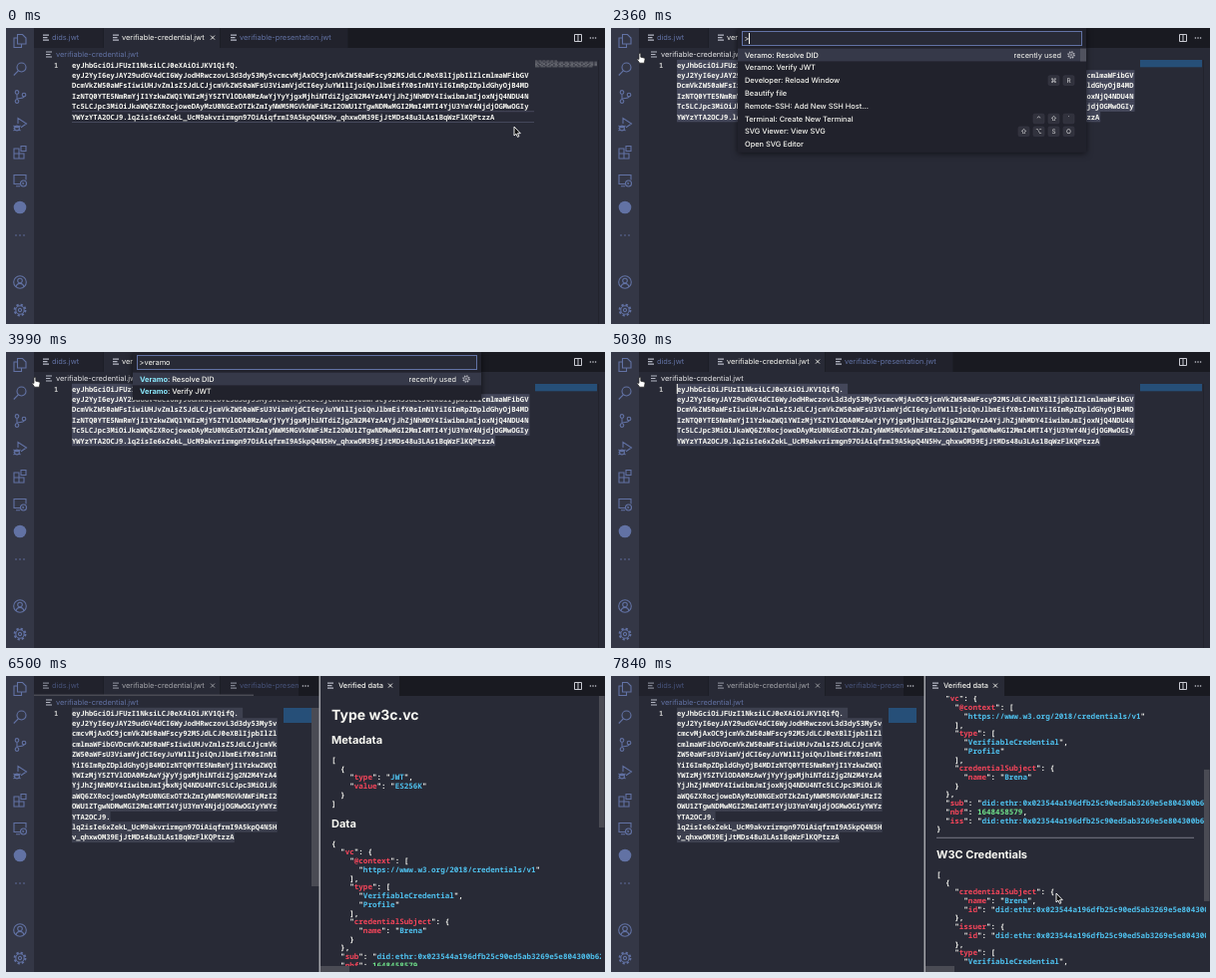
These frames come from a looping animation (600x297 px, 8 s). An HTML page:

```html
<!DOCTYPE html>
<html lang="en">
<head>
<meta charset="utf-8">
<title>Verifying a credential in the editor</title>
<style>
html, body { margin: 0; width: 100%; height: 100%; overflow: hidden; background: #282a36; }
svg { display: block; }
#stage { width: 100%; height: 100%; }
text { white-space: pre; text-rendering: geometricPrecision; font-family: Inter, "DejaVu Sans", sans-serif; }
.mono { font-family: "Noto Sans Mono", "DejaVu Sans Mono", monospace; font-weight: 600; }
.shadow { filter: drop-shadow(0 1px 3px #0009); }
</style>
</head>
<body>
<svg id="stage" viewBox="0 0 600 297"></svg>
<script>
const LOOP = 8000;
const BG = '#282a36', BAR = '#191a21', PANEL = '#21222c', SEL = '#44475a', IDLE_SEL = '#3d404f';
const MUTED = '#6272a4', FG = '#f8f8f2', THUMB = '#4a4b54';
const LEFT = 66, TOP = 37, LINE = 10.4, CHAR = 4.285;

const header = 'eyJhbGciOiJFUzI1NksiLCJ0eXAiOiJKV1QifQ.';
const payload =
  'eyJ2YyI6eyJAY29udGV4dCI6WyJodHRwczovL3d3dy53My5vcmcvMjAxOC9jcmVkZW50aWFscy92MSJdLCJ0eXBlIjpbIlZlcmlmaWFibGV' +
  'DcmVkZW50aWFsIiwiUHJvZmlsZSJdLCJjcmVkZW50aWFsU3ViamVjdCI6eyJuYW1lIjoiQnJlbmEifX0sInN1YiI6ImRpZDpldGhyOjB4MD' +
  'IzNTQ0YTE5NmRmYjI1YzkwZWQ1YWIzMjY5ZTVlODA0MzAwYjYyYjgxMjhiNTdiZjg2N2M4YzA4YjJhZjNhMDY4IiwibmJmIjoxNjQ4NDU4N' +
  'Tc5LCJpc3MiOiJkaWQ6ZXRocjoweDAyMzU0NGExOTZkZmIyNWM5MGVkNWFiMzI2OWU1ZTgwNDMwMGI2MmI4MTI4YjU3YmY4NjdjOGMwOGIy' +
  'YWYzYTA2OCJ9.';
const signature = 'lq2isIe6xZekL_UcM9akvrirmgn97OiAiqfrmI9A5kpQ4N5Hv_qhxwOM39EjJtMDs48u3LAs1BqWzFlKQPtzzA';

const chunk = (s, n) => s.match(new RegExp(`.{1,${n}}`, 'g'));
const wideRows = [header, ...chunk(payload + signature, 107)];
const slimRows = [header, ...chunk(payload, 48), ...chunk(signature, 48)];

const did = 'did:ethr:0x023544a196dfb25c90ed5ab3269e5e804300b62b8128b57bf867c8c08b2af3a068';
const types = ['VerifiableCredential', 'Profile'];
const name = 'Brena';
const metadata = [{ type: 'JWT', value: 'ES256K' }];
const data = {
  vc: { '@context': ['https://www.w3.org/2018/credentials/v1'], type: types, credentialSubject: { name } },
  sub: did, nbf: 1648458579, iss: did
};
const credentials = [{ credentialSubject: { name, id: did }, issuer: { id: did }, type: types }];

const commands = [
  ['Veramo: Resolve DID'], ['Veramo: Verify JWT'], ['Developer: Reload Window', '⌘R'], ['Beautify file'],
  ['Remote-SSH: Add New SSH Host...'], ['Terminal: Create New Terminal', '⌃⇧`'],
  ['SVG Viewer: View SVG', '⇧⌥SO'], ['Open SVG Editor']
];

// Basic shapes; text is placed by its vertical centre.
const rect = (x, y, w, h, fill, more = '') => `<rect x="${x}" y="${y}" width="${w}" height="${h}" fill="${fill}" ${more}/>`;
const text = (x, y, s, fill = FG, size = 7.4, more = '') =>
  `<text x="${x}" y="${y + size * .36}" font-size="${size}" fill="${fill}" ${more}>${s}</text>`;
const path = (d, stroke, width = 1, more = '') =>
  `<path d="${d}" fill="none" stroke="${stroke}" stroke-width="${width}" ${more}/>`;
const ring = (x, y, r, more = '') => `<circle cx="${x}" cy="${y}" r="${r}" ${more}/>`;
const at = (x, y, s, more = '', scale = 1) => `<g transform="translate(${x} ${y}) scale(${scale})" ${more}>${s}</g>`;
const clamp = (v, lo = 0, hi = 1) => Math.max(lo, Math.min(hi, v));

const dots = gap => [-gap, 0, gap].map(x => ring(x, 0, .8, 'fill="currentColor" stroke="none"')).join('');
const gear = ring(0, 0, 5.4, 'stroke-width="2" stroke-dasharray="2.2 2.04"') + ring(0, 0, 4.2) + ring(0, 0, 1.6);
const p = d => `<path d="${d}"/>`;
const icons = [
  [13, p('M-2.5-6.5h5l3.5 3.5v6h-8.5zM-2.5-3h-3.5v9.5h7.5v-3')],
  [41, ring(1.5, -1.5, 4.5) + p('M-1.7 1.8l-4.5 4.7')],
  [69, ring(-3, -4.6, 1.8) + ring(-3, 4.6, 1.8) + ring(4, -2, 1.8) + p('M-3-2.8v5.6M4-.2c0 2.6-7 1-7 3')],
  [97, p('M-2-1v-5.5l8.5 5.5-5.5 3.7M-6.5 1l1.5 1M-6.5 3.5h1.5M-6.5 6l1.5-1M.5 1l-1.5 1M.5 6l-1.5-1M-5 2.6h4') + ring(-3, 3.5, 2.4)],
  [125, p('M-6-4h5v10h-5zM-6 1h10v5h-10M1-6.5h5v5h-5z')],
  [153, p('M0 3.5h-6v-9h12v5M-4 5.8h4') + ring(3.5, 3, 3) + p('M2.5 2l1 1-1 1')],
  [180, ring(0, 0, 6.3, 'fill="currentColor" stroke="none"')],
  [208, dots(4)],
  [255, ring(0, 0, 6.3) + ring(0, -1.5, 2.3) + p('M-4 4.8c1-4.6 7-4.6 8 0')],
  [283, gear]
];
const activityBar = rect(0, 0, 28, 297, '#343746') +
  icons.map(([y, s]) => at(14, y, s, `fill="none" stroke="${MUTED}" color="${MUTED}" stroke-width="1.1"`)).join('');

const fileIcon = (x, y, c = '#b4b7c4') => path(`M${x} ${y - 2.5}h6M${x} ${y}h4.5M${x} ${y + 2.5}h6`, c, 1.1);
const cross = (x, y, c) => path(`M${x - 2} ${y - 2}l4 4m0-4l-4 4`, c, .9);
const actions = path('M569.5 6.5h7v7h-7zM573 6.5v7', '#c9cad2') + at(588, 10, dots(2.6), 'color="#c9cad2"');

function tabs(focused) {
  const on = focused ? FG : '#a2a3a8', off = focused ? MUTED : '#47537a', icon = focused ? '#b4b7c4' : '#80838f';
  const y = 9.6;
  return rect(28, 0, 572, 20, BAR) + rect(28, 0, 69.5, 20, PANEL) + rect(98, 0, 116, 20, BG) + rect(214.5, 0, 128, 20, PANEL) +
    fileIcon(37, y, icon) + text(46, y, 'dids.jwt', off) +
    fileIcon(107, y, icon) + text(116, y, 'verifiable-credential.jwt', on) + cross(207, y, on) +
    fileIcon(225, y, icon) + text(234, y, 'verifiable-presentation.jwt', off);
}

const breadcrumb = hover => fileIcon(40, 26.5) + text(50, 26.5, 'verifiable-credential.jwt', hover ? '#e4e4e6' : MUTED);
const rowY = i => TOP + i * LINE;
const rowsText = rows => text(48, TOP, '1', '#c6c6c6', 7.14, 'class="mono"') +
  rows.map((s, i) => text(LEFT, rowY(i), s, FG, 7.14, 'class="mono"')).join('');

// Highlight from the given row and x down to the last character.
function selection(rows, fill, row = 0, x = LEFT) {
  return rows.map((s, i) => {
    if (i < row) return '';
    const from = i === row ? x : LEFT;
    const end = LEFT + s.length * CHAR + (i ? 0 : 4);
    return rect(from, rowY(i) - LINE / 2, Math.max(0, end - from), LINE + .1, fill);
  }).join('');
}

function wideEditor(t, mouse) {
  const dragging = t >= 300, selected = t >= 1100;
  const row = clamp(Math.round((mouse.y - TOP) / LINE), 0, 5);
  const caretX = selected ? LEFT : clamp(mouse.x, LEFT, 490);
  const caretRow = selected ? 0 : row;
  let s = tabs(true) + actions + breadcrumb(t >= 1700) + path('M593.5 32v265', '#22232d');
  s += dragging ? selection(wideRows, SEL, caretRow, caretX) : path('M66 83.7h463M66 94.5h463', SEL);
  s += rowsText(wideRows);
  if (dragging && (t < 2210 || t >= 5030)) s += rect(caretX - .2, rowY(caretRow) - 5, 1, 10, FG);
  s += selected ? rect(530, 32, 62, 7.3, '#264f78') : wideRows.map((r, i) =>
    path(`M530 ${33 + i * 1.17}h${r.length * .58}`, '#8a8b92', .9, `stroke-dasharray="${2 + i % 3} .6 1 .4" opacity=".7"`)).join('');
  const shown = clamp(Math.min((t - 300) / 150, (2360 - t) / 150));
  return s + rect(594, 32, 6, 221, THUMB, `opacity="${shown}"`);
}

function palette(t) {
  const typed = [2650, 2950, 3250, 3250, 3400, 3540].filter(k => t >= k).length;
  const query = 'veramo'.slice(0, typed);
  const list = commands.slice(0, typed > 2 ? 2 : 8);
  const focus = t >= 4430 ? 1 : 0;
  const step = 12.8, height = 22.5 + list.length * step;
  const mark = s => query ? s.replace(new RegExp('\\b' + query, 'gi'), '<tspan fill="#8be9fd" font-weight="700">$&</tspan>') : s;
  const caretX = [138, 142.2, 146.6, 149.4, 153.6, 160, 164.3][typed];
  let s = rect(127, 0, 349, height, PANEL, 'class="shadow"') +
    rect(131.5, 3.5, 340, 14, BG, `stroke="${MUTED}"`) + text(133.5, 10.5, '&gt;' + query);
  if (t < 3990 || t >= 4430) s += rect(caretX, 5, 1, 11, FG);
  s += rect(127, 20.6 + focus * step, 349, step, '#363949');
  if (list.length > 2) s += rect(470, 20.6, 6, 12.8, '#50525e');
  list.forEach(([label, keys = ''], i) => {
    const y = 27 + i * step;
    s += text(134, y, mark(label), FG, 7.4, 'font-weight="500"');
    [...keys].forEach((k, n) => {
      const x = 458.5 - (keys.length - 1 - n) * 15;
      s += rect(x - 5.5, y - 4.8, 11, 9.6, '#31323d', 'rx="1.5" stroke="#3b3c48" stroke-width=".6"') +
        text(x, y, k, '#d8d8da', 6.4, 'text-anchor="middle"');
    });
  });
  return s + text(451, 27, 'recently used', FG, 7.4, 'text-anchor="end"') +
    at(461, 27 + focus * step, gear, 'fill="none" stroke="#c4c5cc"', .58);
}

const tint = (s, c) => `<tspan fill="${c}">${s}</tspan>`;
const paint = line => line.replace(/"([^"]*)"(:?)|\d+/g, (m, word, colon) =>
  word ? `"${tint(word, colon ? '#f4455a' : '#4fc1ee')}"${colon}` : tint(m, '#6fe08a'));
const json = (y, value) => JSON.stringify(value, null, 2).split('\n')
  .map((line, i) => text(326, y + i * 8.73, paint(line), FG, 7.58, 'class="mono"')).join('');
const heading = (y, s, size = 11) => text(326, y, s, FG, size, 'font-weight="700"');
const report = heading(39, 'Type w3c.vc', 14) + heading(64, 'Metadata') + json(84.2, metadata) +
  heading(148.4, 'Data') + json(168, data) + path('M326 316.3h258', '#777985') +
  heading(332.6, 'W3C Credentials') + json(353, credentials);

function splitView(t) {
  const k = clamp((t - 7330) / 510);
  const scroll = 154 * k * k * (3 - 2 * k);
  const shown = `opacity="${clamp(Math.min((t - 6400) / 100, (7150 - t) / 300))}"`;
  let s = tabs(false) + rect(293, 0, 307, 20, BAR) + at(300, 10, dots(2.6), 'color="#c9cad2"') +
    rect(28, 18.5, 220, 1.5, THUMB, shown) + breadcrumb(t < 6300) +
    selection(slimRows, IDLE_SEL) + rowsText(slimRows) + rect(278, 32, 28, 15, '#264f78') +
    rect(306, 32, 8, 179, THUMB, shown) +
    rect(315, 0, 79, 20, BG) + rect(313.5, 0, 1.5, 297, '#a4a5ab') +
    fileIcon(322, 9.6) + text(333, 9.6, 'Verified data', FG, 7.4, 'font-weight="500"') + cross(385, 9.6, FG) + actions;
  if (t >= 5620)
    s += `<svg x="316" y="20" width="280" height="271" viewBox="316 20 280 271">${at(0, -scroll, report)}</svg>` +
      rect(594, 20 + scroll * .48, 5.5, 132, THUMB) + rect(315, 291, 29, 6, THUMB);
  return s;
}

// Pointer way points: time, x, y.
const route = [
  [0, 509, 99], [150, 509, 99], [300, 491, 88], [1190, 47, 39], [1330, 32, 36], [1630, 32, 36],
  [1770, 28, 25], [6210, 28, 25], [6500, 161, 105], [7250, 446, 218], [LOOP, 446, 218]
];
function mouseAt(t) {
  const i = Math.max(1, route.findIndex(r => r[0] > t));
  const [t0, x0, y0] = route[i - 1], [t1, x1, y1] = route[i];
  const k = (t - t0) / (t1 - t0);
  return { x: x0 + (x1 - x0) * k, y: y0 + (y1 - y0) * k };
}
function pointer(t, { x, y }) {
  if (t >= 1770 && t < 6250)
    return at(x, y, '<path d="M0 .8q1-1 1.8 0v3.4l3.4.8q1 .4.8 1.6l-.7 3.6h-4.6l-2.6-3.6q.4-1.2 1.9-.2z" fill="#fff" stroke="#222" stroke-width=".7"/>');
  if (t >= 6250 && x < 312)
    return at(x, y, path('M-2-5q2 0 2 1.5v7q0 1.5-2 1.5M2-5q-2 0-2 1.5M2 5q-2 0-2-1.5', '#fff', 1));
  return at(x, y, '<path d="M0 0v9l2-1.8 1.5 3.2 1.4-.7-1.4-3h2.8z" fill="#111" stroke="#fff" stroke-width=".9" stroke-linejoin="round"/>');
}

const stage = document.getElementById('stage');
let start, last;
function frame(now) {
  start ??= now;
  const t = (now - start) % LOOP, mouse = mouseAt(t);
  const html = rect(0, 0, 600, 297, BG) + (t < 5180 ? wideEditor(t, mouse) : splitView(t)) +
    (t >= 2210 && t < 5030 ? palette(t) : '') + activityBar + pointer(t, mouse);
  if (html !== last) stage.innerHTML = last = html;
  requestAnimationFrame(frame);
}
requestAnimationFrame(frame);
</script>
</body>
</html>
```
